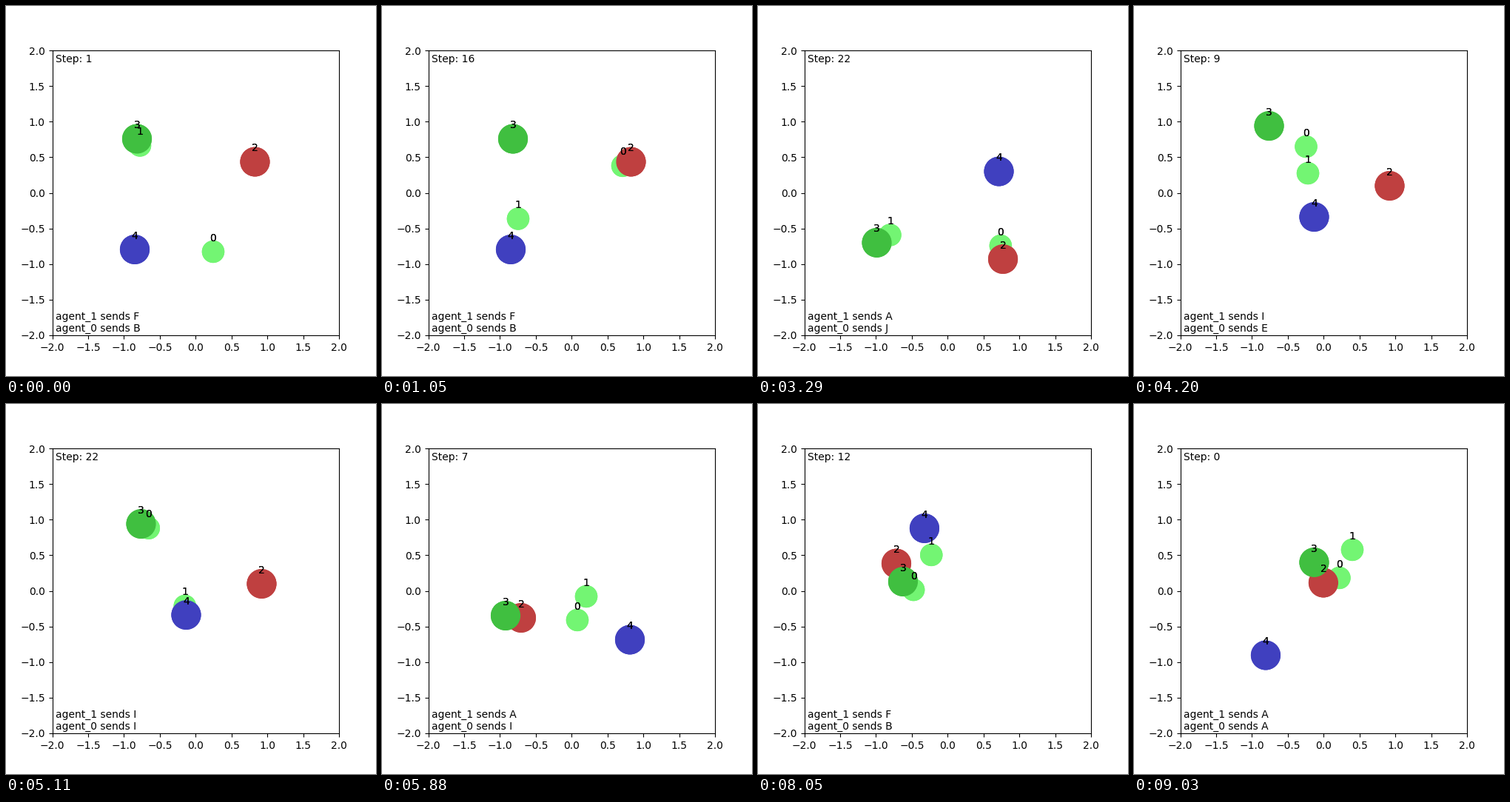
A matplotlib script for the animation above (9.1 s loop, 500x500 px).

```python
import math
from itertools import pairwise

import matplotlib.pyplot as plt
from matplotlib.animation import FuncAnimation
from matplotlib.patches import Circle

FRAMES, INTERVAL, EPISODE_LEN = 130, 70, 26
RATE = 0.17       # how fast an agent closes in on its goal
WORD_STEPS = 8    # steps before an agent switches its letter

AGENT, RED, GREEN, BLUE = [
    (0.45, 0.96, 0.45), (0.75, 0.25, 0.25),
    (0.25, 0.75, 0.25), (0.25, 0.25, 0.75)]
LOOKS = [(AGENT, 0.15), (AGENT, 0.15), (RED, 0.2), (GREEN, 0.2), (BLUE, 0.2)]


class Agent:
    """Heads for a landmark by way of a few (step, x, y) points."""

    def __init__(self, goal, letters, *keys):
        self.goal, self.letters, self.keys = goal, letters, keys

    def place(self, marks, step):
        for (s0, *a), (s1, *b) in pairwise(self.keys):
            if step <= s1:
                return blend(b, a, (left(step) - left(s1)) / (left(s0) - left(s1)))
        s, *last = self.keys[-1]
        return blend(marks[self.goal - 2], last, left(step) / left(s))

    def word(self, step):
        if step == 0:
            return "A"
        return self.letters[step // WORD_STEPS % len(self.letters)]


def left(step):
    """Share of the way still ahead, for a critically damped approach."""
    return (1 + RATE * step) * math.exp(-RATE * step)


def blend(a, b, u):
    return tuple(p + (q - p) * u for p, q in zip(a, b))


# Each episode: three fixed landmarks, then the two agents.
EPISODES = [
    ([(0.828, 0.436), (-0.818, 0.758), (-0.849, -0.795)],
     Agent(2, "BJ", (1, 0.245, -0.826), (16, 0.71, 0.38)),
     Agent(4, "F", (1, -0.777, 0.665), (16, -0.746, -0.364))),
    ([(0.772, -0.930), (-0.988, -0.700), (0.715, 0.301)],
     Agent(2, "JD", (8, 0.596, 0.078)),
     Agent(3, "A", (8, 0.008, -0.119))),
    ([(0.921, 0.099), (-0.761, 0.940), (-0.132, -0.338)],
     Agent(3, "IE", (9, -0.245, 0.649)),
     Agent(4, "I", (9, -0.219, 0.275))),
    ([(-0.705, -0.379), (-0.921, -0.348), (0.813, -0.686)],
     Agent(3, "IE", (7, 0.080, -0.410)),
     Agent(4, "A", (7, 0.204, -0.078), (15, 1.02, -0.55))),
    ([(-0.715, 0.384), (-0.622, 0.130), (-0.323, 0.878)],
     Agent(3, "DB", (0, 0.286, -0.306), (9, -0.42, -0.03)),
     Agent(4, "F", (0, 0.575, -0.410), (9, -0.19, 0.36))),
    ([(-0.003, 0.114), (-0.132, 0.400), (-0.808, -0.904)],
     Agent(2, "A", (0, 0.219, 0.182)),
     Agent(2, "A", (0, 0.400, 0.577))),
]

plt.rcParams["font.family"] = "DejaVu Sans"
fig, ax = plt.subplots(figsize=(5, 5), dpi=100)
ax.set(xlim=(-2, 2), ylim=(-2, 2))

# Discs and labels are painted twice, which hardens their edges.
bodies = []
for _ in range(2):
    for i, (color, radius) in enumerate(LOOKS):
        disc = ax.add_patch(Circle((0, 0), radius, color=color))
        bodies.append((i, disc, ax.text(0, 0, str(i), ha="center")))
step_text = ax.text(-1.95, 1.83, "")
says = [ax.text(-1.95, y, "") for y in (-1.95, -1.78)]


def draw(frame):
    episode, step = divmod(frame + 1, EPISODE_LEN)
    marks, *agents = EPISODES[episode]
    spots = [agent.place(marks, step) for agent in agents] + marks
    for i, disc, label in bodies:
        x, y = spots[i]
        disc.center = x, y
        label.set_position((x, y + 0.15))
    step_text.set_text(f"Step: {step}")
    for i, agent in enumerate(agents):
        says[i].set_text(f"agent_{i} sends {agent.word(step)}")
    return []


anim = FuncAnimation(fig, draw, frames=FRAMES, interval=INTERVAL,
                     init_func=lambda: draw(0), repeat=True, repeat_delay=0)
plt.show()
```
